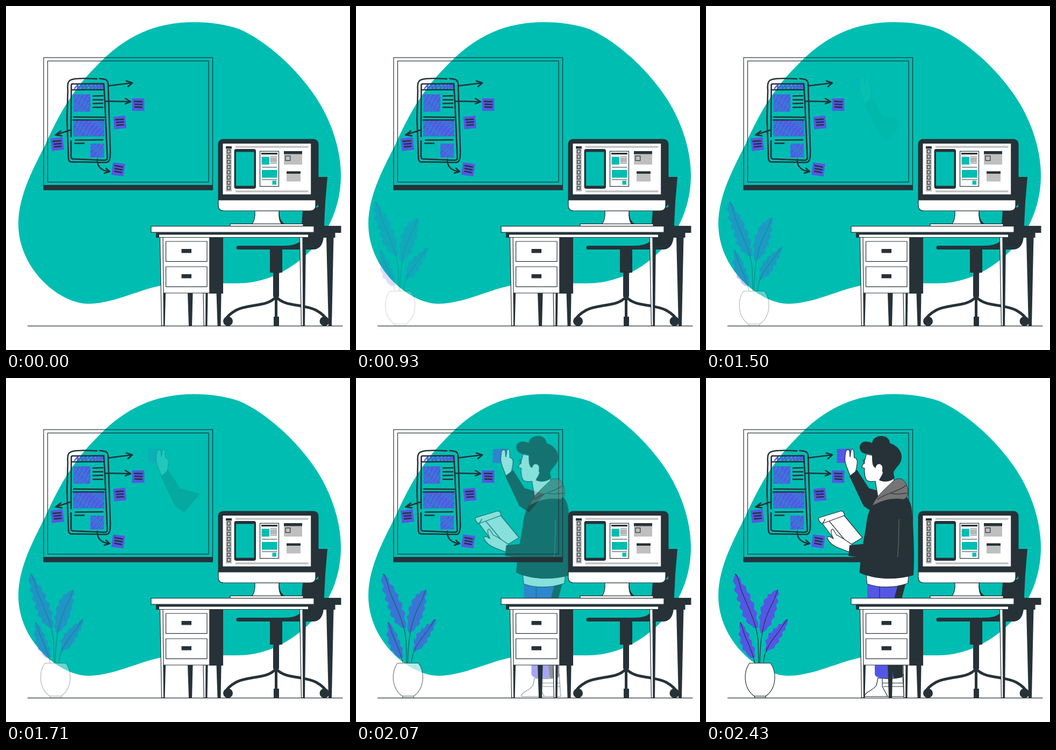
An HTML page without scripts that plays this animation: 640x640 px, repeating every 2.71 s.

```html
<!DOCTYPE html>
<html lang="en">
<head>
<meta charset="utf-8">
<title>Design studio</title>
<style>
html, body { margin: 0; width: 100%; height: 100%; overflow: hidden; background: #fff; }
svg { display: block; width: 100vw; height: 100vh; }
.dark { fill: #263238; }
.teal { fill: #00bdb2; }
.purple { fill: #5457e6; }
.grey { fill: #bfbfbf; }
.white { fill: #fff; }
.line { fill: none; stroke: #263238; stroke-width: 1.2; }
.box { fill: #fff; stroke: #263238; stroke-width: 1.2; stroke-linejoin: round; }
.pen { fill: none; stroke: #263238; stroke-width: 2.6; stroke-linecap: round; stroke-linejoin: round; }
.leaf { fill: #5457e6; stroke: #5457e6; stroke-width: 2; stroke-linejoin: round; }

/* 38 ticks per loop, one tick = 2.6316% */
.plant, .arm, .body { animation: plant 2710ms -6ms infinite; }
.arm { animation-name: arm; }
.body { animation-name: body; }
@keyframes plant {
  0% { opacity: 0; transform: translateX(-29px); animation-timing-function: steps(2); }
  5.263% { opacity: 0; transform: translateX(-29px); animation-timing-function: steps(5); }
  18.421% { opacity: .1; transform: translateX(-24px); animation-timing-function: steps(11); }
  47.368% { opacity: .29; transform: translateX(-13.6px); animation-timing-function: steps(6); }
  63.158% { opacity: .39; transform: translateX(-8.5px); animation-timing-function: steps(5); }
  76.316% { opacity: .7; transform: translateX(-3.7px); animation-timing-function: steps(5); }
  89.474%, 100% { opacity: 1; transform: none; }
}
@keyframes arm {
  0% { opacity: 0; transform: translateX(29px); animation-timing-function: steps(20); }
  52.632% { opacity: 0; transform: translateX(29px); animation-timing-function: steps(4); }
  63.158% { opacity: .14; transform: translateX(21px); animation-timing-function: steps(5); }
  76.316% { opacity: .56; transform: translateX(10.8px); animation-timing-function: steps(5); }
  89.474%, 100% { opacity: 1; transform: none; }
}
@keyframes body {
  0% { opacity: 0; transform: translateX(23.5px); animation-timing-function: steps(24); }
  63.158% { opacity: 0; transform: translateX(23.5px); animation-timing-function: steps(5); }
  76.316% { opacity: .53; transform: translateX(12.3px); animation-timing-function: steps(2); }
  81.579% { opacity: .77; transform: translateX(6.4px); animation-timing-function: steps(3); }
  89.474%, 100% { opacity: 1; transform: none; }
}
</style>
</head>
<body>
<svg viewBox="0 0 640 640">
  <defs>
    <pattern id="hatch" width="7" height="40" patternUnits="userSpaceOnUse" patternTransform="rotate(38)">
      <path d="M1.5 0L2.6 16M5 10L4.4 31M1 22L2.2 38" stroke="#00bdb2" stroke-width=".9" stroke-linecap="round"/>
    </pattern>
    <g id="note">
      <rect class="purple" x="-11.3" y="-11.6" width="22.6" height="23.2"/>
      <path class="pen" stroke-width="2.2" d="M-7 -6L7 -5.5M-6 -.8L7 -.3M-6 4.4L6.5 4.9"/>
    </g>
    <rect id="tool" class="line" x="411.7" y="267.5" width="5.4" height="6.2"/>
    <g id="drawer">
      <rect class="box" x="297.5" y="438" width="76.5" height="37.3"/>
      <rect class="dark" x="326.5" y="452" width="18.5" height="7.5"/>
    </g>
  </defs>

  <path class="teal" d="M350 30C380 30 408 34 434 43C483 64 540 115 578 172C612 225 624 280 623 320C622 365 606 410 575 446C545 480 495 516 430 516C380 516 340 514 300 518C250 525 205 553 153 554C100 554 23 490 23 405C23 350 55 295 73 258C95 210 120 160 167 113C215 62 270 30 350 30Z"/>

  <g id="board">
    <rect class="line" x="70" y="96" width="314.5" height="246"/>
    <rect class="line" x="77.5" y="102.3" width="299.5" height="225.3"/>
    <rect class="dark" x="70" y="333" width="314.5" height="9.3"/>
    <g class="purple">
      <path fill="none" stroke="#5457e6" stroke-width="2.4" stroke-linejoin="round" d="M127 154L134 146L133 154L141 147L142 154L149 145L148 154L156 146L157 154L164 145L163 155L171 145L169 155L177 145L175 154L181 145L179 153"/>
      <rect x="125.5" y="164.5" width="31.5" height="32"/>
      <rect x="125" y="213" width="58" height="29.5"/>
      <rect x="157" y="256" width="25" height="25.5"/>
    </g>
    <path fill="url(#hatch)" d="M126 165h31v31h-31zM125 213h58v29h-58zM157 256h25v25h-25z"/>
    <path class="pen" d="M169 135.5C150 134.5 130 134 122 137C115 139 114 145 115 158L113.5 210L116 280C116 288 118 291 124 290L186 291C192 291 194.500 286 194 268L190 145C189 137 186 136 174 135
      M121 243L121.500 147Q122 144.500 126 145L182 144.500L184 180L188.500 282Q189 287 183 287L124 284.500Q121 284 121 280L121 251
      M123 156L182 155.500M162 167.500L180 167M162 174.500H180M162 181.500L180 181M162 188.500H180
      M126 206.500L183 207M125 212H182M129 249.500L180 249M128 255.500H145
      M191 148.500L235 143M224 139.500L235 143L227 150
      M185 177L232 178M222 172L232 178L222 182
      M119 231L92 240M102 232.500L92 240L104 241.500
      M170 285C169 299 178 307 193 308M186 302L193 308L183 311"/>
    <use href="#note" transform="translate(246 183.500)"/>
    <use href="#note" transform="translate(211.700 216.800) rotate(-6)"/>
    <use href="#note" transform="translate(95.500 257) rotate(-7)"/>
    <use href="#note" transform="translate(208.800 304) rotate(8)"/>
  </g>

  <g class="plant">
    <path class="leaf" d="M55 365L63 374L65 383L73 388L75 398L82 404L81 413L89 420L88 430L94 437L92 447L96 455L96 464L90 464L84 459L76 454L76 447L68 442L70 433L63 427L66 418L58 412L61 403L53 395L57 387L51 378Z"/>
    <path class="leaf" d="M133 395L135 402L130 408L134 416L129 422L131 430L126 436L127 444L121 450L121 458L114 463L111 469L102 473L100 462L102 452L99 445L104 438L102 428L109 422L108 414L115 409L116 403L122 403L126 397Z"/>
    <path class="leaf" d="M64 455L69 461L72 465L74 472L80 477L79 485L85 490L84 498L90 503L89 511L91 518L88 520L84 520L77 514L75 508L69 505L69 497L64 492L66 484L61 477L65 470L63 462Z"/>
    <path class="leaf" d="M151 450L151 455L147 462L147 468L141 472L141 480L135 484L135 491L129 495L126 502L120 504L112 509L111 503L114 497L111 489L117 484L117 476L124 474L126 467L132 466L136 459L143 458L146 452Z"/>
    <path class="line" d="M54 364C62 372 62 386 67 398C80 432 94 455 97 490L98 531M134 394C130 399 130 407 126 414C112 440 101 465 100 531M63 454C69 462 68 470 72 478C80 498 87 510 91 531M152 449C147 453 143 461 138 468C125 486 107 505 107 531"/>
    <path class="box" d="M81 530.500C70 545 68 576 90 592H111C133 576 131 545 120 530.500Z"/>
    <rect class="box" x="90.500" y="592" width="20.500" height="3"/>
  </g>

  <g class="arm">
    <path class="purple" d="M244 132L269 131.500L268 158L243.500 158Z"/>
    <path class="box" d="M268 182C265 172 259 162 258.500 152C259 143 259 138 261 135Q265 131 267 136L268 147L270 134Q274 130 275 136L275.500 148C279 149 281.500 151 281.500 156C281 164 280 169 278 175Z"/>
    <path class="dark" d="M267 183L281 171L303 205L340 215.500L311 250L293 238Z"/>
  </g>

  <g class="body">
    <path class="purple" d="M314 530V551C316 560 332 559 346 558L356 556V530Z"/>
    <path class="dark" d="M345 530H366V550C370 556 362 558 349 559Z"/>
    <path class="box" d="M320 558L317 572C309 583 296 583 295 592.500H346V559Q332 560 320 558Z"/>
    <path class="box" d="M328 558.500Q348 561 366 556L368.500 592.500H338L328 574ZM328 567.500H367M330 574H368"/>
    <path class="purple" d="M300 380L300 411H351L358 384Z"/>
    <path class="dark" d="M357 384L372 380L364 411H350Z"/>
    <path class="line" d="M323 387V410"/>
    <path class="box" d="M298 364L299.500 383C322 391 350 391 375.500 382L377.500 364Z"/>

    <path class="box" d="M298 142C297 153 292 160 289.500 166L295 168C294 176 296 188 300 191Q307 194 315 192L320 222L350 195L346 150Z"/>
    <path class="dark" d="M301 141C290 142 285 134 286 127C288 118 298 116 309 121C310 112 318 108 326 108C336 108 342 114 342 121C356 126 364 136 364 147C364 158 356 164 352 170C347 176 349 181 351 185C346 193 331 195 322 190C325 184 328 180 329 176L320 160L316 167C309 166 309 155 309 143Z"/>
    <path class="white" d="M316 166C317 159 326 158 328 165C329 172 326 180 321 181C317 180 316 173 316 166Z"/>
    <path class="line" d="M291 153L296 152M292 155C296 154 296 159 293 160"/>

    <path class="box" d="M216 270L257 256L291 297L263 314L242 305Z"/>
    <path class="box" d="M210 260L251 247.500Q258 248 257 256L216 271Q208 266 210 260ZM229 266L262 306M217 270Q222 265 221 262"/>
    <path class="box" d="M270 325L249 317C237 313 229 306 225.500 298C226 293 232 295 237 299C232 289 231 281 236 281L243 292C252 296 260 302 272 310Z"/>
    <path class="dark" d="M310 236C303 246 299 260 298 275L292 309L267 311L265 331L288 334L285.500 362C312 375 352 377 386 367C388 340 387 290 383 246C382 235 378 225 371 219L338 214Z"/>
    <path d="M309.500 238C314 222 338 202 350 190C359 184 370 188 373 199C378 211 377 221 368 226C350 223 330 226 309.500 238Z" fill="#757575" stroke="#263238" stroke-width="1"/>
    <path class="line" d="M319 226C334 214 355 213 372 200M343 214C354 218 366 215 375 214"/>
    <path d="M359 263L358 310L356.500 333" fill="none" stroke="#757575" stroke-width="1"/>
  </g>

  <g id="chair">
    <path class="dark" d="M581 318H598L594 365L591 428C590 446 582 453 571 453H432A3.500 3.500 0 0 1 432 446H515C532 446 546 443 548 434L552 380L581 374Z"/>
    <path class="dark" d="M491 452H514V496H508V541H505V578H508V595H498V578H500V541H497V496H491Z"/>
    <path d="M502 541C488 560 450 554 428 566Q412 575 407 586M503 541C517 560 555 554 577 566Q593 575 598 586" fill="none" stroke="#263238" stroke-width="5"/>
    <circle class="dark" cx="413" cy="586.500" r="9"/>
    <circle class="dark" cx="592.500" cy="586.500" r="9"/>
  </g>

  <g id="monitor">
    <rect class="dark" x="394.500" y="247.500" width="187" height="127" rx="9"/>
    <path class="dark" d="M500 381H509C508 395 512 401 519 406H500Z"/>
    <path class="box" d="M463 381H508C507 394 509 401 513 406H457C462 401 464 394 463 381Z"/>
    <path class="box" d="M395 361H576V371Q576 381 566 381H405Q395 381 395 371Z"/>
    <rect class="box" x="417" y="405.300" width="136" height="5"/>
    <rect class="white" x="403.500" y="256" width="163.700" height="94.500"/>
    <path class="grey" d="M427 260.500H562.500V263.700H427ZM427 343.200H562.500V346.600H427ZM409 261H420V345H409ZM517 270H551V295H517ZM522 308H548V326.500H522Z"/>
    <path class="dark" d="M409 261H420V265.300H409ZM517 270H551V275.500H517ZM522 307.500H548V312H522ZM475 273H505V276.300H475Z"/>
    <use href="#tool"/>
    <use href="#tool" y="9.700"/>
    <use href="#tool" y="19.400"/>
    <use href="#tool" y="29.100"/>
    <use href="#tool" y="38.800"/>
    <use href="#tool" y="48.500"/>
    <use href="#tool" y="58.200"/>
    <use href="#tool" y="67.900"/>
    <rect class="dark" x="424.500" y="266" width="40.500" height="74" rx="4"/>
    <rect class="teal" x="428" y="271.500" width="33.500" height="63" rx="1"/>
    <rect class="line" x="472.500" y="270.300" width="35" height="65.300"/>
    <path class="teal" d="M475.500 280.500H490V295H475.500ZM476 305H504.500V319.500H476ZM495.500 325H503V332.500H495.500Z"/>
    <path class="line" d="M491.500 281H504M491.500 284.700H504M491.500 288.400H504M491.500 292H504M476 300H504.500M476 323H504.500"/>
    <rect class="line" x="520" y="279" width="8.800" height="8.500"/>
  </g>

  <g id="desk">
    <path class="dark" d="M292 534H297L295.500 595H293ZM338 534H347.500L346 595H340ZM371 534H375.500L374.500 595H371.500ZM391.500 534H400.500L399.500 595H393.500ZM552 430H558L556 595H552.500ZM596 430H609.500L606 595H600Z"/>
    <path class="box" d="M367 534H372L371.700 595H368.300ZM546.500 430H552L553 595H549.500Z"/>
    <rect class="box" x="291" y="430" width="88" height="104"/>
    <rect class="dark" x="378.500" y="430" width="25.500" height="105"/>
    <path class="box" d="M286.500 430H292L293.500 595H289.500Z"/>
    <use href="#drawer"/>
    <use href="#drawer" y="47"/>
    <rect class="dark" x="279" y="421" width="333.500" height="10"/>
    <rect class="white" x="280" y="425.500" width="282" height="4.500"/>
    <rect class="dark" x="279" y="421" width="6" height="10"/>
    <rect class="dark" x="560" y="409" width="63.500" height="13"/>
    <rect class="box" x="270" y="409.700" width="303" height="11.500"/>
  </g>
  <path class="line" d="M40 595.300H626.500"/>
</svg>
</body>
</html>
```
